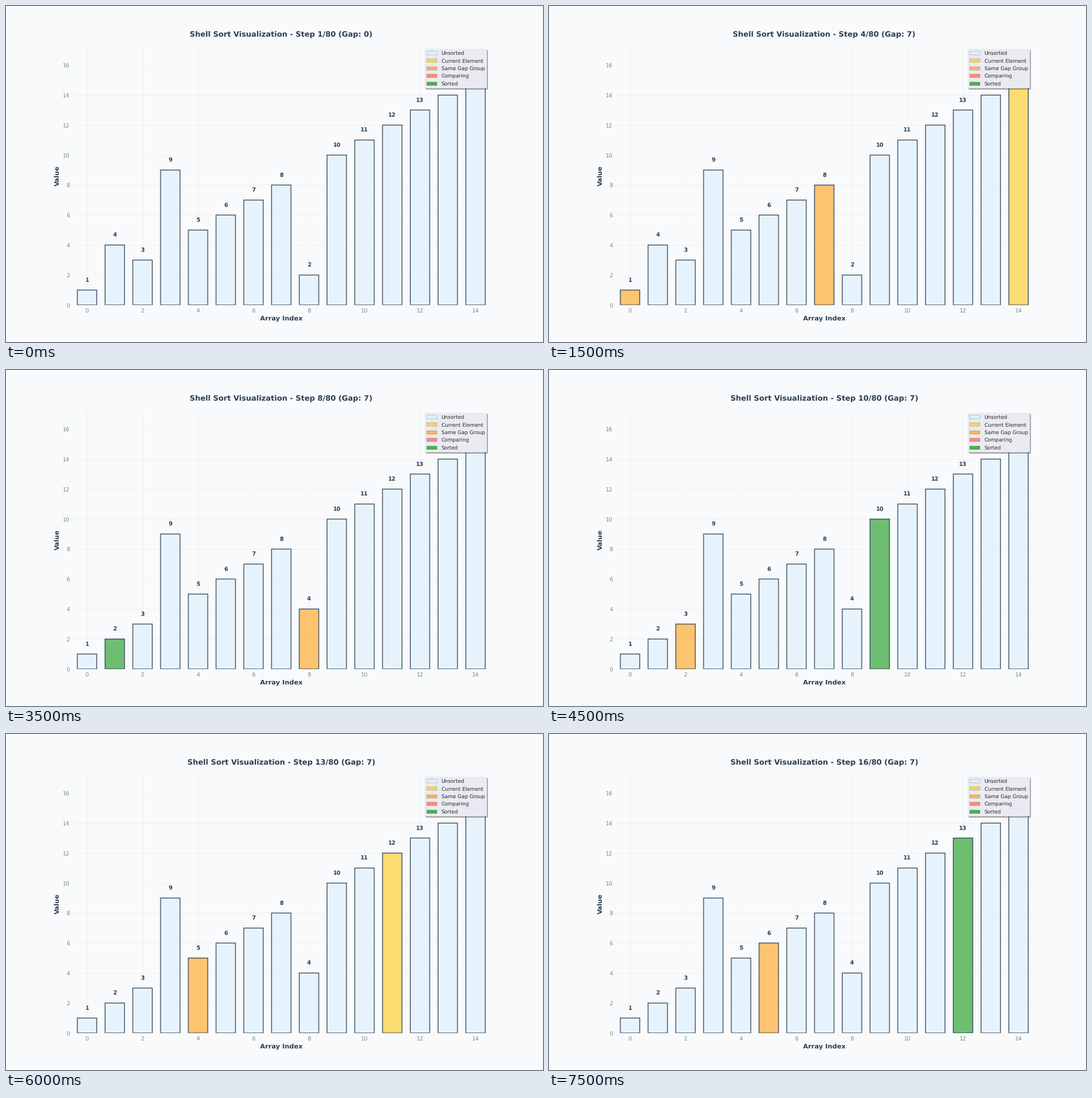
Animation of 947x592 px, one loop 8 s. Source, as a matplotlib script:

```python
from itertools import islice

import matplotlib.pyplot as plt
from matplotlib.animation import FuncAnimation
from matplotlib.patches import Rectangle

plt.rcParams.update({
    "font.family": "DejaVu Sans",
    "text.hinting": "none",
    "patch.linewidth": 0.3,
})

BG, INK, MUTED = "#f8fafc", "#2c3e50", "#7f8c8d"
COLORS = {
    "Unsorted": "#e3f2fd",
    "Current Element": "#ffd54f",
    "Same Gap Group": "#ffb74d",
    "Comparing": "#ff8a80",
    "Sorted": "#4caf50",
}
VALUES = [1, 4, 3, 9, 5, 6, 7, 8, 2, 10, 11, 12, 13, 14, 15]
N = len(VALUES)
STEPS, TOTAL, STEP_MS = 16, 80, 500


def shell_sort(values):
    """Yield (array, gap, {index: role}) for every step, one gap group at a time."""
    a = list(values)

    def state(start, gap, marks):
        roles = {k: "Same Gap Group" for k in range(start, N, gap)}
        roles.update(marks)
        return a[:], gap, roles

    yield a[:], 0, {}
    gap = N // 2
    while gap:
        for start in range(gap):
            for i in range(start + gap, N, gap):
                item, j = a[i], i
                yield state(start, gap, {i: "Current Element"})
                while j >= gap and a[j - gap] > item:
                    yield state(start, gap, {j: "Comparing", j - gap: "Comparing"})
                    a[j], a[j - gap] = a[j - gap], item
                    j -= gap
                yield state(start, gap, {j: "Sorted"})
        gap //= 2


steps = list(islice(shell_sort(VALUES), STEPS))

fig, ax = plt.subplots(figsize=(16, 10), dpi=59.2, facecolor=BG)
ax.set_facecolor(BG)
ax.set_xlim(-0.5, N - 0.5)
ax.set_ylim(0, max(VALUES) * 1.15)
ax.set_xticks(range(0, N, 2))
ax.set_yticks(range(0, 17, 2))
ax.tick_params(length=0, pad=7, labelsize=12, labelcolor=MUTED)
ax.set_axisbelow(True)
ax.grid(color="#cccccc", alpha=0.3, linewidth=0.8)
ax.spines[:].set_visible(False)
ax.set_xlabel("Array Index", fontsize=14, fontweight="bold", color=INK)
ax.set_ylabel("Value", fontsize=14, fontweight="bold", color=INK, labelpad=5)
title = ax.set_title("", fontsize=16, fontweight="bold", color=INK, pad=20)

bars = ax.bar(range(N), VALUES, width=0.7, edgecolor=INK, linewidth=2,
              alpha=0.8, snap=False)
labels = [ax.text(i, 0, "", ha="center", va="baseline", fontsize=12,
                  fontweight="bold", color=INK) for i in range(N)]

swatches = [Rectangle((0, 0), 1, 1, facecolor=c, edgecolor=INK)
            for c in COLORS.values()]
ax.legend(swatches, list(COLORS), loc="upper right", fontsize=11, shadow=True,
          framealpha=1, facecolor="#eaeaf2", edgecolor="#cccccc",
          labelcolor="#262626", labelspacing=0.525)


def draw(n):
    array, gap, roles = steps[n]
    title.set_text(f"Shell Sort Visualization - Step {n + 1}/{TOTAL} (Gap: {gap})")
    for i, (value, bar, label) in enumerate(zip(array, bars, labels)):
        bar.set_height(value)
        bar.set_facecolor(COLORS[roles.get(i, "Unsorted")])
        label.set_text(str(value))
        label.set_y(value + 0.56)
    return [title, *bars, *labels]


anim = FuncAnimation(fig, draw, frames=STEPS, interval=STEP_MS,
                     repeat=True, repeat_delay=0, blit=False)
plt.show()
```
